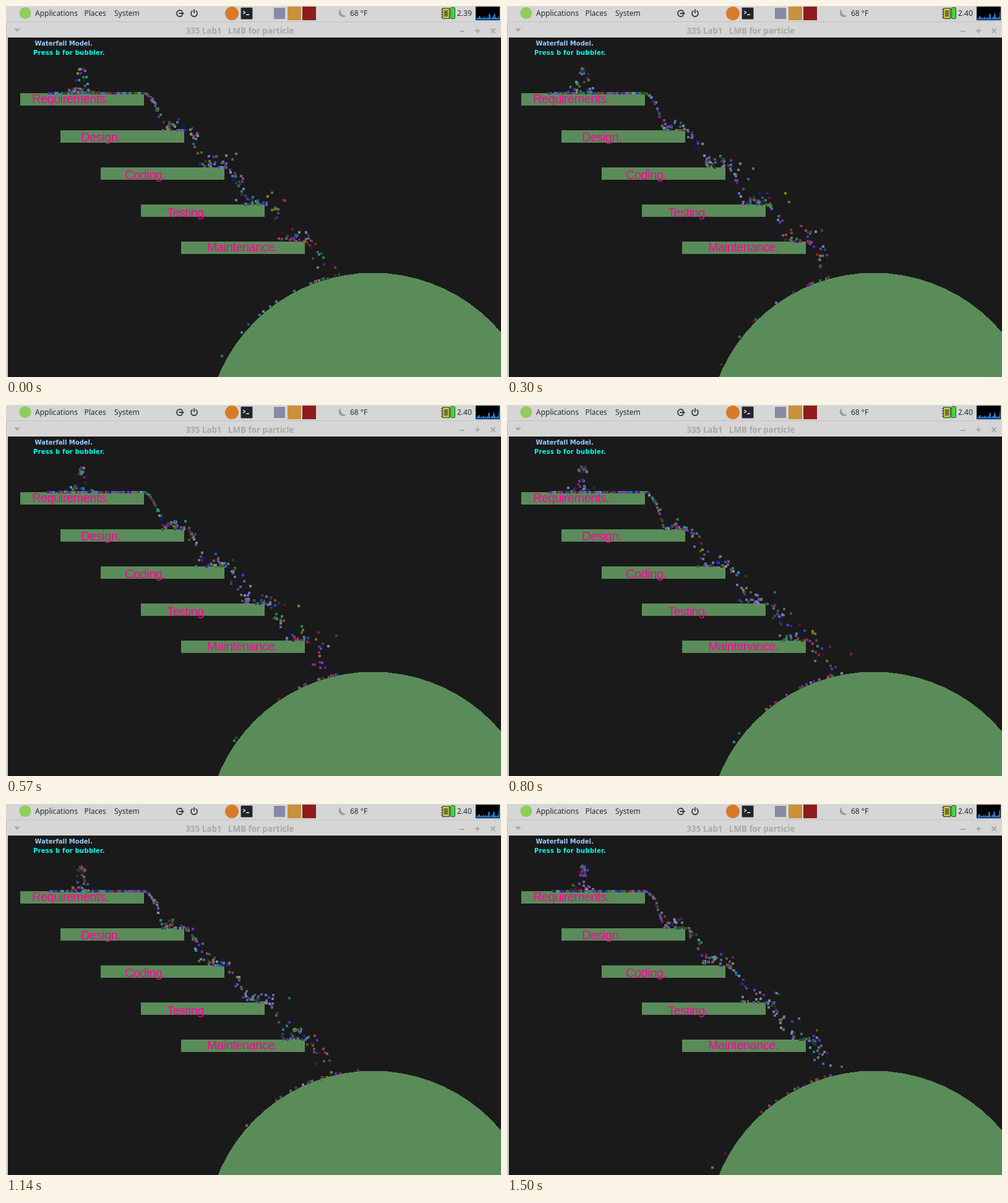
These frames come from a looping animation (800 px wide and 600 px high, 4.47 s). An HTML page:

```html
<!DOCTYPE html>
<html lang="en">
<head>
<meta charset="utf-8">
<title>Waterfall Model</title>
<style>
html, body { margin: 0; width: 100%; height: 100%; overflow: hidden; background: #1a1a1a; }
svg { display: block; width: 100vw; height: 100vh; }
text { white-space: pre; }
.panel { font: 12px "Noto Sans", sans-serif; fill: #2b2b2b; }
.title { font: bold 13.33px "Noto Sans", sans-serif; fill: #a9a9a9; }
.hud { font: bold 10px "DejaVu Sans", sans-serif; }
.label { font: 20px "Liberation Sans", Arial, sans-serif; letter-spacing: -.5px; fill: #ff0099; }
.line { fill: none; stroke: #3c3c3c; stroke-width: 1.8; stroke-linecap: round; }
.btn { fill: none; stroke: #a9a9a9; stroke-width: 2; }
.crisp { shape-rendering: crispEdges; }
</style>
</head>
<body>
<svg viewBox="0 0 800 600" preserveAspectRatio="none">
  <rect width="800" height="600" fill="#1a1a1a"/>
  <g id="scene" class="crisp" fill="#5a8c5a"></g>
  <g id="drops" class="crisp"></g>
  <g id="labels"></g>
  <text class="hud" x="46.500" y="64" fill="#99ccff">Waterfall Model.</text>
  <text class="hud" x="44" y="79" fill="#00ffee" letter-spacing=".25">Press b for bubbler.</text>

  <!-- window frame -->
  <rect y="25" width="3" height="575" fill="#d6d6d6"/>
  <rect width="800" height="51" fill="#d6d6d6"/>
  <path d="M0.5 600V29Q0.5 25.5 4 25.5H800" fill="none" stroke="#c2c2c2"/>
  <text class="title" x="290.5" y="45">335 Lab1   LMB for particle</text>
  <path d="M13 36.500h10l-5 5.500z" fill="#a9a9a9"/>
  <path class="btn" d="M733 41h8M758 40h8M762 36v8M783.500 36.500l7 7M790.500 36.500l-7 7"/>

  <!-- desktop panel -->
  <circle cx="31" cy="11.500" r="9.500" fill="#8fce5a"/>
  <text class="panel" x="47" y="16">Applications</text>
  <text class="panel" x="126.500" y="16">Places</text>
  <text class="panel" x="175" y="16">System</text>
  <path class="line" d="M284.500 8.500A5 5 0 1 0 284.500 15.500M280 12h6"/>
  <path d="M284 8.500l4 3.500l-4 3.500z" fill="#3c3c3c"/>
  <path class="line" d="M301 8A5 5 0 1 0 307 8M304 6v5"/>
  <circle cx="365" cy="12" r="11" fill="#d97a26"/>
  <rect x="379.500" y="2.500" width="19" height="19" rx="1.500" fill="#23232b" stroke="#8c8c8c"/>
  <path d="M383 8l3.500 2.500l-3.500 2.500M388 14h5" fill="none" stroke="#eee" stroke-width="1.300"/>
  <rect x="433" y="3" width="18" height="18" fill="#8a88a4"/>
  <rect x="455" y="1" width="22" height="22" fill="#c8913a"/>
  <rect x="479" y="1" width="22" height="22" fill="#8e1c1c"/>
  <path d="M541 5A7 7 0 1 0 550 15.500A8 8 0 0 1 541 5z" fill="#9a9a9a"/>
  <text class="panel" x="556" y="16">68 °F</text>
  <path d="M703 6h15M703 10h15M703 14h15M703 18h15" stroke="#4a4a20" stroke-width="1.500"/>
  <rect x="705.500" y="3.500" width="11" height="17" fill="#b9c34a" stroke="#3a3a1c"/>
  <rect x="708" y="7" width="6" height="10" fill="#6b7330"/>
  <rect x="718.500" y="2.500" width="7" height="18" rx="1" fill="#3fd83f" stroke="#1f5a1f"/>
  <text class="panel" id="load" x="729" y="16"></text>
  <rect x="759" y="1" width="39" height="22" fill="#000"/>
  <path id="graph" class="crisp" fill="#2277cc"/>
</svg>
<script>
const LOOP = 4470;
const TIMES = [0, 50, 110, 180, 240, 300, 420, 470, 520, 570, 620, 710, 800,
  1030, 1080, 1155, 1230, 1310, 1350, 1425, 1500];
const GRAVITY = 0.1, WARMUP = 1000, RATE = 0.75;
const HILL = { x: 593, y: 702, r: 270.5, sides: 72 };
const STEPS = [["Requirements.", 42, 157], ["Design.", 121, 219], ["Coding.", 192, 280],
  ["Testing.", 260, 341], ["Maintenance.", 325, 397]];
const boxes = STEPS.map((s, i) => ({ left: 23 + 65 * i, right: 223 + 65 * i, top: 141 + 60 * i }));

const $ = id => document.getElementById(id);

function seeded(s) {
  return () => {
    s = s + 0x6D2B79F5 | 0;
    let t = Math.imul(s ^ s >>> 15, 1 | s);
    t = t + Math.imul(t ^ t >>> 7, 61 | t) ^ t;
    return ((t ^ t >>> 14) >>> 0) / 4294967296;
  };
}
const rand = seeded(335);
const between = (a, b) => a + (b - a) * rand();

function emit() {
  const shade = max => Math.round(between(15, max));
  return {
    x: between(119, 126), y: between(100, 104),
    vx: between(-0.47, 0.47), vy: between(-0.6, 0.2),
    bounce: between(0.15, 0.56), lift: between(5, 45), onHill: false,
    color: `rgb(${shade(150)},${shade(150)},${shade(210)})`
  };
}

function slide(p) {
  p.spin += 0.0095 * Math.sin(p.angle);
  p.angle += p.spin;
  const off = Math.max(0, -p.angle - 0.6);
  const r = HILL.r + 2 + p.lift * off * off;
  p.x = HILL.x + r * Math.sin(p.angle);
  p.y = HILL.y - r * Math.cos(p.angle);
}

function move(p) {
  if (p.onHill) return slide(p);
  const before = p.y;
  p.vy += GRAVITY;
  p.x += p.vx;
  p.y += p.vy;
  boxes.forEach((b, i) => {
    if (p.x < b.left || p.x > b.right || p.y < b.top || before > b.top) return;
    p.y = b.top;
    if (p.vy > 0.6) {
      p.vy *= -p.bounce;
      p.bounce = between(0.15, 0.56);
      if (i) p.vx *= between(0.85, 1.2);
    } else p.vy = 0;
    p.vx += 0.0044;
  });
  const dx = p.x - HILL.x, dy = HILL.y - p.y;
  if (Math.hypot(dx, dy) < HILL.r + 2) {
    p.onHill = true;
    p.angle = Math.atan2(dx, dy);
    p.spin = p.vx * 0.5 / HILL.r;
  }
}

// Run the flow once and keep its state at every refresh time.
function simulate() {
  const shots = [];
  let drops = [], tick = 0;
  for (const t of TIMES) {
    const end = WARMUP + Math.round(t * 0.06);
    for (; tick < end; tick++) {
      if (rand() < RATE) drops.push(emit());
      drops.forEach(move);
      drops = drops.filter(p => p.y < 604);
    }
    shots.push(drops.map(p =>
      `<rect x="${Math.round(p.x) - 2}" y="${Math.round(p.y) - 2}" width="4" height="4" fill="${p.color}"/>`
    ).join(""));
  }
  return shots;
}

function graphPath(shift) {
  const rnd = seeded(21);
  let d = "";
  for (let i = -2; i < 37; i++) {
    const x = 762 + i - shift;
    const wave = Math.max(0, Math.sin(i * 0.75)) * (i > 12 ? 8 : 2);
    const h = Math.round(1 + wave + rnd() * 4);
    if (x >= 760 && x < 797) d += `M${x} 22v${-h}h1v${h}z`;
  }
  return d;
}

function drawScene() {
  const pts = Array.from({ length: HILL.sides }, (_, i) => {
    const a = i * 2 * Math.PI / HILL.sides;
    return [HILL.x + HILL.r * Math.sin(a), HILL.y - HILL.r * Math.cos(a)].map(v => v.toFixed(1)).join();
  });
  $("scene").innerHTML = boxes.map(b =>
    `<rect x="${b.left}" y="${b.top}" width="200" height="20"/>`).join("") +
    `<polygon points="${pts.join(" ")}"/>`;
  $("labels").innerHTML = STEPS.map(([name, x, y]) =>
    `<text class="label" x="${x}" y="${y}">${name}</text>`).join("");
}

const shots = simulate();
let shown = -1;

function render(ms) {
  const t = ms % LOOP;
  let k = TIMES.length - 1;
  while (TIMES[k] > t) k--;
  if (k === shown) return;
  shown = k;
  $("drops").innerHTML = shots[k];
  $("load").textContent = t < 180 ? "2.39" : "2.40";
  $("graph").setAttribute("d", graphPath((t >= 180) + (t >= 1155)));
}

drawScene();
render(0);
const start = performance.now();
function frame() {
  render(performance.now() - start);
  requestAnimationFrame(frame);
}
requestAnimationFrame(frame);
</script>
</body>
</html>
```
